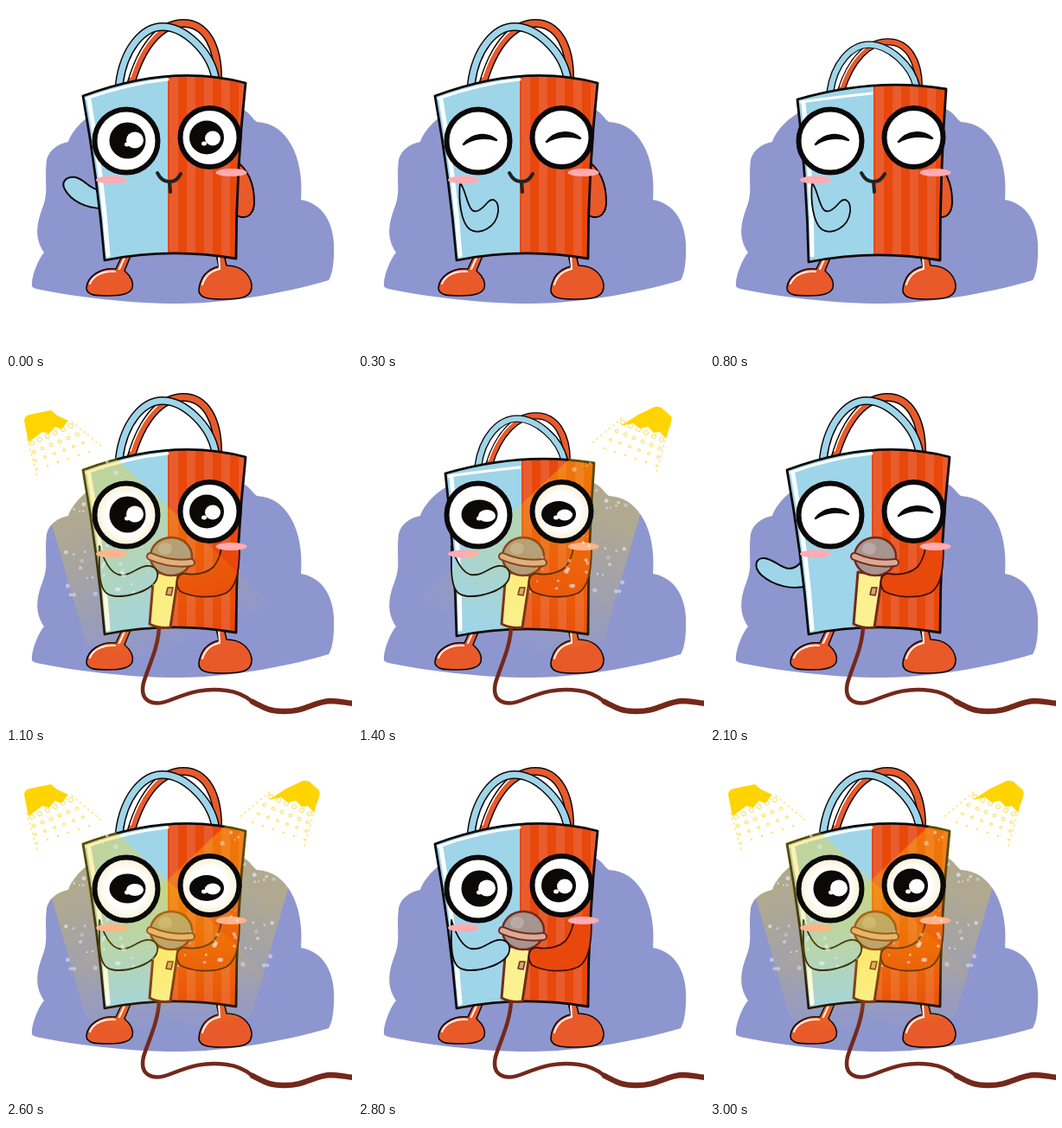
An HTML page with a canvas for the animation above (3200 ms loop, 400 px wide and 400 px high).

```html
<!DOCTYPE html>
<html lang="en">
<head>
<meta charset="utf-8">
<title>Singing shopping bag</title>
<style>
html, body { margin: 0; width: 100%; height: 100%; overflow: hidden; background: #fff; }
canvas { display: block; width: 100%; height: 100%; }
</style>
</head>
<body>
<canvas id="stage" width="400" height="400"></canvas>
<script>
const ctx = document.getElementById('stage').getContext('2d');
const LOOP = 3200;
const BLUE = '#9fd5e9', RED = '#e8480b', ORANGE = '#e85a2a', INK = '#0b0808', BROWN = '#74281a', YELLOW = '#ffd400';

// Each pose lasts until `end`; mic is its vertical offset, lamps are 'L' and 'R'.
const poses = [
  { end: 200, eyes: 'round', arm: 'wave' },
  { end: 300, eyes: 'shut', arm: 'chest', squash: true },
  { end: 800, eyes: 'shut', arm: 'chest' },
  { end: 900, eyes: 'shut', arm: 'chest', squash: true },
  { end: 1100, eyes: 'round', arm: 'hold', mic: 13 },
  { end: 1400, eyes: 'round', arm: 'hold', mic: 0, lamps: 'L' },
  { end: 1700, eyes: 'flat', arm: 'hold', mic: 0, lamps: 'R', squash: true },
  { end: 1900, eyes: 'flat', mic: 0, lamps: 'LR' },
  { end: 2100, eyes: 'shut', arm: 'low', mic: -4, lamps: 'LR', squash: true },
  { end: 2600, eyes: 'shut', arm: 'low', mic: 0 },
  { end: 2800, eyes: 'flat', arm: 'hold', mic: 0, lamps: 'LR' },
  { end: 3000, eyes: 'round', arm: 'hold', mic: 0 },
  { end: 3200, eyes: 'round', arm: 'hold', mic: 0, lamps: 'LR' }
];

const arms = {
  wave: 'M112 234C92 234 75 225 68 212C63 203 70 197 80 198C91 200 95 211 108 213',
  low: 'M112 238C95 243 74 238 60 226C49 216 53 205 63 206C75 208 81 217 91 218C100 218 104 212 108 207',
  chest: 'M118 204C116 225 119 250 129 258C140 266 160 256 162 238C163 225 156 220 149 228C143 235 137 240 132 236C126 231 125 214 118 204Z',
  hold: 'M108 192C108 215 106 240 117 247C130 255 166 246 174 231C178 221 172 214 162 215C150 217 145 227 130 225C120 222 113 208 108 192',
  hang: 'M265 179C279 187 287 205 287 226C287 240 280 245 272 244C265 243 262 237 263 230',
  grip: 'M270 192C270 215 268 238 255 246C240 253 215 252 201 244C194 234 198 223 208 224C222 226 233 222 240 216C246 208 248 202 249 194'
};

function shape(d, fill, stroke, width = 2) {
  const path = new Path2D(d);
  if (fill) { ctx.fillStyle = fill; ctx.fill(path); }
  if (stroke) { ctx.strokeStyle = stroke; ctx.lineWidth = width; ctx.stroke(path); }
}

function oval(x, y, rx, ry, fill, stroke, width = 2) {
  ctx.beginPath();
  ctx.ellipse(x, y, rx, ry, 0, 0, 7);
  if (fill) { ctx.fillStyle = fill; ctx.fill(); }
  if (stroke) { ctx.strokeStyle = stroke; ctx.lineWidth = width; ctx.stroke(); }
}

function withMatrix(matrix, draw) {
  ctx.save();
  ctx.transform(...matrix);
  draw();
  ctx.restore();
}

function shifted(x, y, draw) {
  withMatrix([1, 0, 0, 1, x, y], draw);
}

function cloud() {
  shape('M30 322C30 310 38 292 44 285C34 270 34 255 42 234C50 214 44 206 47 178C50 165 62 159 72 157C76 145 90 128 110 120L270 118C282 122 284 130 290 134C325 135 345 175 341 224C365 228 382 250 379 290C378 305 376 312 373 317C320 333 250 344 200 344C140 344 80 336 40 328Q28 326 30 322Z', '#8e96cf');
}

function handles() {
  const blue = 'M131 90C136 50 158 24 181 24C206 24 236 52 242 83';
  const red = 'M145 88C158 44 180 20 205 20C232 20 245 48 245 83';
  shape(red, null, INK, 10);
  shape(red, null, ORANGE, 7);
  shape('M144 82C154 50 172 26 190 21', null, '#fff', 1.5);
  shape(blue, null, INK, 10);
  shape(blue, null, BLUE, 7);
}

function feet(squash) {
  shifted(squash ? -4 : 0, 0, () => {
    shape('M93 326C94 312 110 302 127 304L134 289H144L137 306C145 313 148 319 146 326C143 334 130 335 119 335C105 335 93 335 93 326Z', ORANGE, INK, 1.6);
    shape('M97 321C101 311 113 306 126 307M131 304L137 291', null, '#fff', 2);
  });
  shape('M223 327C225 312 234 304 246 301L243 287H252L255 300C272 300 282 310 284 322C285 336 275 339 250 339C232 339 222 337 223 327Z', ORANGE, INK, 1.6);
  shape('M227 322C230 312 237 306 247 304L246 289', null, '#fff', 2);
}

function bag(squash) {
  const [left, top, right, rightTop, peak] = squash ? [101, 108, 273, 96, 82] : [89, 104, 277, 89, 66];
  const sag = squash ? 2 : 0, mid = squash ? 189 : 187, side = squash ? 112 : 106;
  const outline = `M${left} ${top}Q191 ${peak} ${right} ${rightTop}Q266 190 266 ${292 + sag}Q190 ${279 + sag} 114 ${294 + sag}Q${side} 200 ${left} ${top}Z`;
  ctx.save();
  ctx.clip(new Path2D(outline));
  ctx.fillStyle = BLUE;
  ctx.fillRect(80, 60, 120, 250);
  ctx.fillStyle = RED;
  ctx.fillRect(mid, 60, 100, 250);
  ctx.fillStyle = '#e95c2d';
  for (let x = mid + 2; x < 270; x += 20) ctx.fillRect(x, 60, 10, 250);
  shape(`M${left + 7} ${top + 5}Q${side + 6} 200 118 288`, null, '#fff', 5);
  shape(`M${left + 4} ${top + 3}Q140 ${peak + 24} 187 ${peak + 19}`, null, '#fff', 3);
  ctx.restore();
  shape(outline, null, INK, 2.8);
}

function eyeball(x, y, r, lit) {
  const white = ctx.createRadialGradient(x, y, r * 0.6, x, y, r);
  white.addColorStop(0, '#fff');
  white.addColorStop(1, lit ? '#f6f0d2' : '#fff');
  oval(x, y, r, r, white, INK, 6);
}

function drawEyes(eyes, lamps) {
  eyeball(139, 156, 36.5, lamps.includes('L'));
  eyeball(235.5, 152, 34, lamps.includes('R'));
  if (eyes === 'shut') {
    shape('M122 160C132 147 149 146 160 155C149 151 134 152 122 160ZM218 157C228 144 246 143 257 153C246 149 230 150 218 157Z', INK, INK, 2.5);
    return;
  }
  const flat = eyes === 'flat';
  oval(140.5, 155.5, 21, flat ? 17 : 21, INK);
  oval(149, flat ? 157 : 155, 10, flat ? 7 : 9.5, '#fff');
  oval(140, 160, 3, 2.5, '#fff');
  oval(232, flat ? 155 : 152, 20, flat ? 15 : 19.5, INK);
  oval(239, flat ? 156 : 153, 9, flat ? 6.5 : 8.5, '#fff');
  oval(229, 159, 3, 2.5, '#fff');
}

function microphone() {
  const tail = 'M285 372C300 380 306 383 320 383C345 384 355 372 375 371C385 371 392 373 402 374';
  shape('M177 285C176 310 165 330 159 350C154 372 170 378 190 370C215 360 230 356 255 359C270 361 278 366 285 372', null, BROWN, 4.5);
  shape(tail, null, BROWN, 6.5);
  shape('M171 222L199 226L190 286Q178 288 166 282Z', '#fbf190', BROWN, 3);
  shape('M187 240H193L191 249L185 248Z', '#d5a77c', BROWN, 1.5);
  oval(191, 204, 24, 22, '#a6948f', BROWN, 2.5);
  oval(184, 195, 8, 7, '#b9aaa5');
  const ring = 'M167 204Q190 214 214 211';
  shape(ring, null, BROWN, 10);
  shape(ring, null, '#d9aa98', 6);
}

// Small seeded generator for the specks of light.
let seed = 9;
const random = () => (seed = seed * 16807 % 2147483647) / 2147483647;
const specks = Array.from({ length: 80 }, () => {
  const y = 50 + random() * 200;
  return { x: 20 + (y - 66) * 0.29 + random() * 105, y, r: 1 + random() * 1.7, a: 0.3 + random() * 0.35 };
});

function beam() {
  ctx.globalCompositeOperation = 'source-atop';
  const glow = ctx.createLinearGradient(50, 45, 170, 325);
  glow.addColorStop(0, 'rgba(255,212,0,.36)');
  glow.addColorStop(0.4, 'rgba(255,212,0,.3)');
  glow.addColorStop(1, 'rgba(255,212,0,0)');
  shape('M24 66L93 306L210 330L340 290L82 48Z', glow);
  for (const s of specks) oval(s.x, s.y, s.r, s.r, `rgba(235,240,255,${s.a})`);
  ctx.globalCompositeOperation = 'source-over';
}

function dots() {
  for (let row = 0; row < 4; row++) {
    for (let i = 0; i < 6; i++) {
      const r = 2.6 - row * 0.6;
      oval(30 + i * (9 + row) + row * 2, 73 - i * 4 + row * 10, r, r, null, '#ffdc50', 1);
    }
  }
  ctx.setLineDash([2, 4]);
  shape('M24 68L37 114M76 48L112 78', null, '#ffe06a', 1.2);
  ctx.setLineDash([]);
}

function lampLeft() {
  beam();
  dots();
  shape('M21 47Q21 42 27 40L52 35L59 41L72 47L64 57L57 54L50 62L42 60L34 66L26 72Z', YELLOW);
}

function lampRight() {
  withMatrix([-1, 0, 0, 1, 377, -4], beam);
  withMatrix([-1, 0, 0, 1, 381, -4], dots);
  shape('M304 53L324 40L343 31Q350 30 354 35L362 42Q364 46 359 58L356 68L349 60L342 61L335 54L326 56L318 50Z', YELLOW);
}

function draw({ squash, eyes, arm, mic, lamps = '' }) {
  const holding = mic !== undefined;
  const front = arm === 'chest' || arm === 'hold';
  ctx.clearRect(0, 0, 400, 400);
  ctx.lineJoin = ctx.lineCap = 'round';
  cloud();
  withMatrix(squash ? [0.9, 0, 0, 0.83, 21, 24.8] : [1, 0, 0, 1, 0, 0], handles);
  feet(squash);
  if (arm && !front) shape(arms[arm], BLUE, INK);
  if (!holding) shifted(squash ? -7 : 0, 0, () => shape(arms.hang, ORANGE, INK));
  bag(squash);
  shape('M175 193Q180 203 188 203Q197 204 202 194M189 203L190 215', null, '#222', 4);
  if (holding) shifted(0, mic, microphone);
  if (front) shape(arms[arm], BLUE, INK, 1.8);
  if (holding) shape(arms.grip, RED, '#38100a', 1.8);
  oval(122, 201, 18, 4.5, '#ffabb3');
  oval(260.5, 192.5, 18, 4.5, '#ffabb3');
  if (lamps.includes('L')) lampLeft();
  if (lamps.includes('R')) lampRight();
  drawEyes(eyes, lamps);
}

function tick(now) {
  const t = now % LOOP;
  draw(poses.find(p => t < p.end));
  requestAnimationFrame(tick);
}
tick(0);
</script>
</body>
</html>
```
